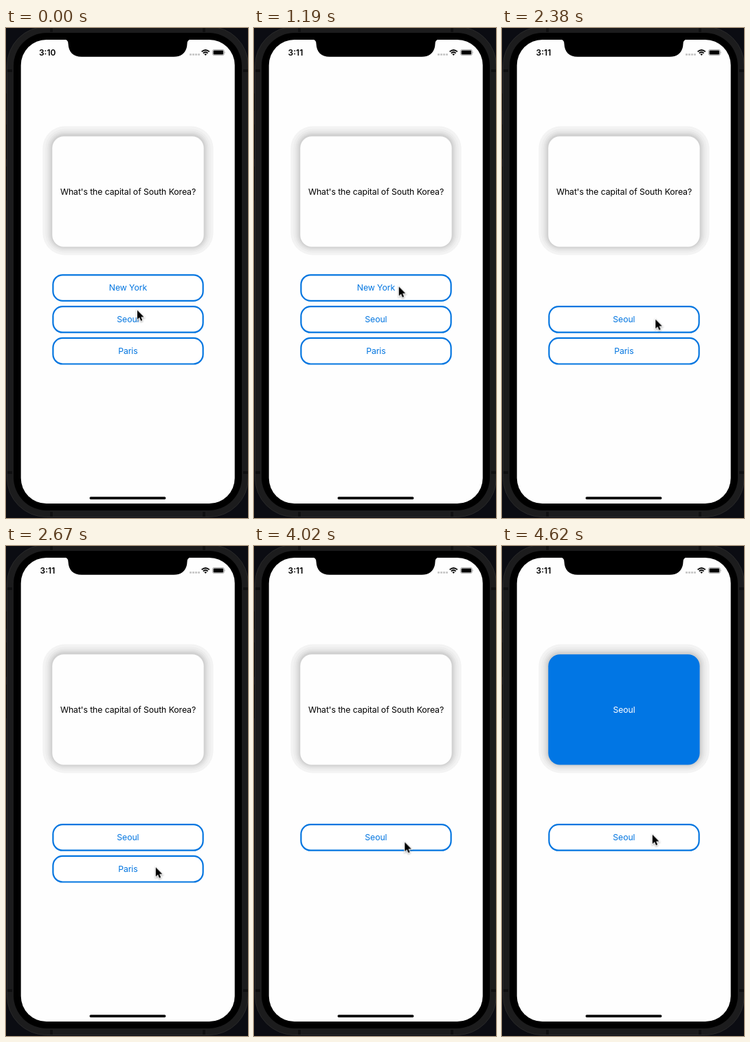
Animation of 352x711 px, one loop 8000 ms. Source, as an HTML page:

```html
<!DOCTYPE html>
<html lang="en">
<head>
<meta charset="utf-8">
<title>Quiz card</title>
<style>
  html, body { margin: 0; width: 100%; height: 100%; overflow: hidden; background: #0b0c12; }
  svg { display: block; width: 352px; height: 711px; }
  text { font: 12.3px Inter, "Open Sans", sans-serif; letter-spacing: -.1px; text-anchor: middle; }
  .clock { font-size: 12px; font-weight: 600; letter-spacing: 0; }
  .option rect { fill: #fff; stroke: #0476e0; stroke-width: 2.2; }
  .option text { fill: #0476e0; }
</style>
</head>
<body>
<svg viewBox="0 0 352 711">
  <!-- phone body -->
  <rect width="352" height="711" fill="#0b0c12"/>
  <path d="M0 95V120M0 140V190M0 201V250" stroke="#020202" stroke-width="3"/>
  <rect x="1.5" y="-2" width="351" height="711.5" rx="57" fill="#1c1c1d" stroke="#29292a"/>
  <path d="M2 62H9M2 645H9M345 62H352M345 645H352M66 0V6M288 0V6M66 702V709M288 702V709" stroke="#101011" stroke-width="4"/>
  <rect x="11" y="7" width="332" height="693" rx="48" fill="#000"/>
  <rect x="21.7" y="17" width="311" height="673" rx="37" fill="#fefefe"/>
  <path d="M85 16.5Q90.500 17 90.500 23C91 35 98 41.800 110 41.800H244C256 41.800 263 35 263.500 23Q263.500 17 269 16.500Z"/>
  <rect x="121.500" y="680.200" width="111" height="3.800" rx="1.900"/>

  <!-- status bar -->
  <text class="clock" id="early" x="60.200" y="40">3:10</text>
  <text class="clock" id="late" x="60.400" y="40">3:11</text>
  <path d="M267 38.500H282" stroke="#c4c4c4" stroke-width="2.600" stroke-dasharray="3 1"/>
  <g fill="none" stroke="#000" stroke-width="1.900">
    <path d="M284.600 34.400Q290.200 29.400 295.800 34.400M286.800 36.600Q290.200 33.500 293.600 36.600"/>
  </g>
  <path d="M288.300 38.100Q290.200 36.500 292.100 38.100L290.200 40Z"/>
  <rect x="300.400" y="31.400" width="17" height="8.200" rx="2.300" fill="none" stroke="#999" stroke-width=".8"/>
  <rect x="301.600" y="32.600" width="14.600" height="5.800" rx="1.200"/>
  <path d="M318.500 34V37Q319.800 35.500 318.500 34" fill="#999"/>

  <!-- card -->
  <g id="shadow"></g>
  <rect id="card" x="67.300" y="157.200" width="220.300" height="160.400" rx="17"/>
  <text id="question" x="177.500" y="242">What's the capital of South Korea?</text>
  <text id="answer" x="177.500" y="242" fill="#fff">Seoul</text>

  <g id="options"></g>

  <path id="cursor" d="M0 0V13.500L3.100 10.600 5.200 15.400 7.400 14.500 5.300 9.800H9.600Z"
    stroke="#fff" stroke-width="2" paint-order="stroke" style="filter:drop-shadow(0 1px 1px #0005)"/>
</svg>
<script>
const LOOP = 8000;
const byId = id => document.getElementById(id);

function add(parent, tag, attrs, text = '') {
  const node = document.createElementNS('http://www.w3.org/2000/svg', tag);
  for (const key in attrs) node.setAttribute(key, attrs[key]);
  node.textContent = text;
  return parent.appendChild(node);
}

// Holds each [time, value] until the next one.
function hold(node, property, steps) {
  const frames = steps.map(([time, value]) =>
    ({ offset: time / LOOP, [property]: value, easing: 'step-end' }));
  frames.push({ offset: 1, [property]: steps.at(-1)[1] });
  node.animate(frames, { duration: LOOP, iterations: Infinity });
}

// Shadow bands: outset and grey level.
[[14, 243], [10, 237], [7, 229], [4.5, 220], [2.2, 209]].forEach(([out, grey]) =>
  add(byId('shadow'), 'rect', {
    x: 67.3 - out, y: 156.5 - out, width: 220.3 + out * 2, height: 160.4 + out * 1.9,
    rx: 17 + out * 1.1, fill: `rgb(${grey},${grey},${grey})`
  }));

const options = ['New York', 'Seoul', 'Paris'].map((name, i) => {
  const y = 358.3 + i * 45.8;
  const group = add(byId('options'), 'g', { class: 'option' });
  add(group, 'rect', { x: 68.4, y, width: 218.2, height: 37.6, rx: 14 });
  const label = add(group, 'text', { x: 177.4, y: y + 23.1 }, name);
  return { group, label };
});
const [newYork, seoul, paris] = options;

hold(byId('early'), 'opacity', [[0, 1], [900, 0]]);
hold(byId('late'), 'opacity', [[0, 0], [900, 1]]);

hold(newYork.label, 'opacity', [[0, 1], [1630, .65]]);
hold(newYork.group, 'opacity', [[0, 1], [1780, 0]]);
hold(paris.group, 'opacity', [[0, 1], [3120, 0]]);
hold(seoul.label, 'opacity', [[0, 1], [4470, .65], [4620, 1]]);

hold(byId('card'), 'fill', [[0, '#fefefe'], [4620, '#0176e4']]);
hold(byId('question'), 'opacity', [[0, 1], [4620, 0]]);
hold(byId('answer'), 'opacity', [[0, 0], [4620, 1]]);

const path = [
  [0, 191, 409.5], [900, 198.3, 398.7], [1040, 204.5, 383.7], [1190, 210.7, 375.3],
  [1340, 221.7, 375.5], [2380, 223.3, 422.7], [2520, 220, 448.7], [2670, 217.8, 466.2],
  [4020, 219.3, 429.7], [4170, 219, 420.7], [4320, 218.8, 418.7]
];
hold(byId('cursor'), 'transform', path.map(([time, x, y]) => [time, `translate(${x}px, ${y}px)`]));
</script>
</body>
</html>
```
